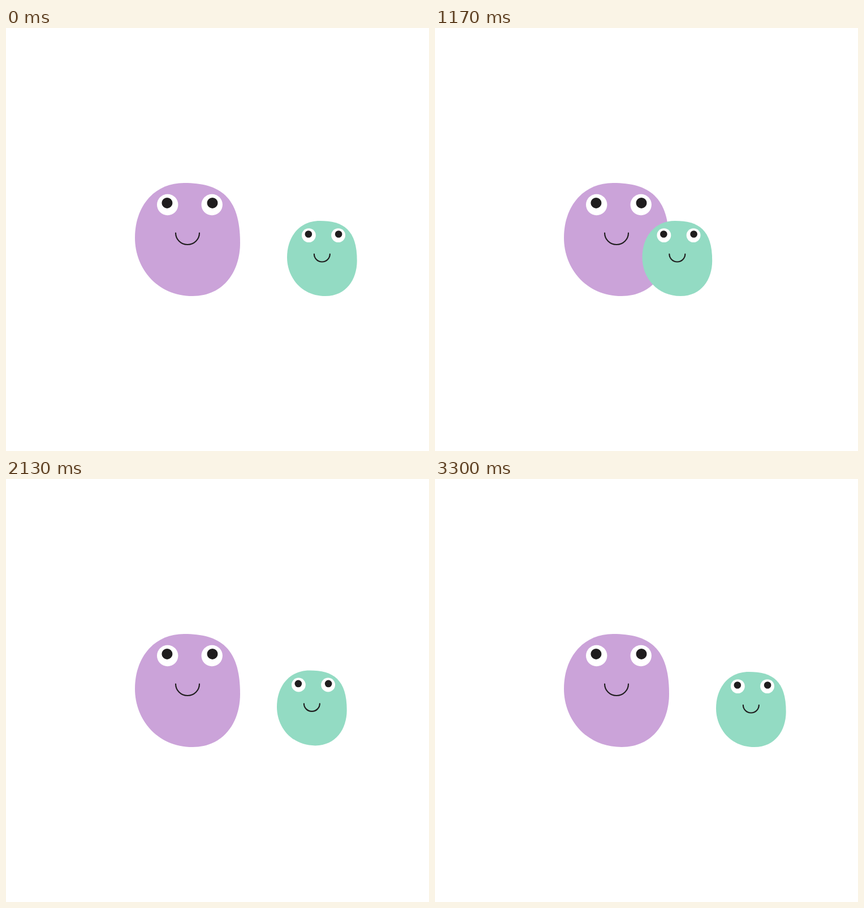
Animation, 748 px wide and 748 px high, one loop 4470 ms. Source, as an HTML page:

```html
<!DOCTYPE html>
<html lang="en">
<head>
<meta charset="utf-8">
<title>Two friends</title>
<style>
  html, body { margin: 0; width: 100%; height: 100%; overflow: hidden; background: #fff; }
  svg { display: block; width: 100vw; height: 100vh; }
  .white { fill: #fff; }
  .pupil { fill: #1f1d1e; }
  .mouth { fill: none; stroke: #1f1d1e; stroke-width: 2.1; stroke-linecap: round; vector-effect: non-scaling-stroke; }
  #arm { fill: none; stroke: #cba3d9; stroke-width: 13; stroke-linecap: round; }
</style>
</head>
<body>
<svg viewBox="0 0 748 748">
  <g id="big" fill="#cba3d9"></g>
  <path id="arm"/>
  <g id="small" fill="#93dbc3"></g>
</svg>
<script>
const LOOP = 4470, STEP = 30, SCALE = 0.665, PULL = 130.5;
const $ = id => document.getElementById(id);
const clamp = v => Math.min(1, Math.max(0, v));
const span = (t, a, b) => clamp((t - a) / (b - a));
const easeOut = (u, n) => 1 - Math.pow(1 - u, n);

const eye = (x, px) => `<g class="eye"><circle class="white" cx="${x}" cy="312.5" r="18.7"/>
  <circle class="pupil" cx="${px}" cy="309.4" r="9.5"/></g>`;
const face = `<path d="M315 274C378 274 414 298 414 380C414 430 385 474 330 474C268 474 228 426 228 371C228 315 262 274 315 274Z"/>
  <g class="eyes">${eye(285.7, 284.9)}${eye(364.2, 365)}</g>
  <path class="mouth" d="M300 362.5a21 20.5 0 0 0 42 0"/>`;

function makeBlob(id) {
  const root = $(id);
  root.innerHTML = face;
  return {
    root,
    eyes: root.querySelector('.eyes'),
    lids: root.querySelectorAll('.eye'),
    mouth: root.querySelector('.mouth')
  };
}
const big = makeBlob('big'), small = makeBlob('small'), arm = $('arm');

function pose(blob, dir, look, open) {
  blob.eyes.setAttribute('transform', `translate(${dir * 7 * look} 0)`);
  blob.mouth.setAttribute('transform', `translate(${dir * 5 * look} ${-5 * look})`);
  for (const lid of blob.lids)
    lid.setAttribute('transform', `translate(0 312.5) scale(1 ${open}) translate(0 -312.5)`);
}

// Pulled in by the arm, then hopping back with a small dip on landing.
function smallOffset(t) {
  if (t < 1800) return [-PULL * easeOut(span(t, 110, 540), 3.09), 0];
  const x = t < 2130
    ? -PULL + 112.5 * span(t, 1800, 2130)
    : -18 * (1 - easeOut(span(t, 2130, 2220), 2));
  let y;
  if (t < 1950) y = -49 * easeOut(span(t, 1800, 1950), 2);
  else if (t < 2160) y = -49 + 58 * Math.pow(span(t, 1950, 2160), 1.45);
  else y = 9 * (1 - span(t, 2160, 2220));
  return [x, y];
}

function drawArm(t) {
  const shown = t > 0 && t < 690;
  arm.style.display = shown ? '' : 'none';
  if (!shown) return;
  let x;
  if (t < 110) x = 400 + 246 * easeOut(span(t, 0, 110), 1.6);
  else if (t <= 540) x = 646 - 139 * easeOut(span(t, 110, 540), 3.41);
  else x = 507 - 26 * span(t, 540, 690);
  arm.setAttribute('d', x < 440
    ? `M390 405L${x} 398`
    : `M390 405C425 385 ${x - 50} 385 ${x - 22} 397C${x - 6} 404 ${x} 412 ${x} 422`);
}

function draw(t) {
  const blink = Math.min(span(t, 900, 1020), 1 - span(t, 1080, 1170));
  const look = Math.pow(Math.sin(Math.PI * span(t, 2700, 3300)), 1.5) || 0;
  const open = 1 - 0.92 * blink;
  pose(big, 1, look, open);
  pose(small, -1, look, open);
  const [dx, dy] = smallOffset(t);
  small.root.setAttribute('transform',
    `translate(${497 + dx} ${474 + dy}) scale(${SCALE}) translate(-228 -474)`);
  drawArm(t);
}

const start = performance.now();
function tick() {
  const t = (performance.now() - start) % LOOP;
  draw(Math.floor(t / STEP) * STEP);
  requestAnimationFrame(tick);
}
tick();
</script>
</body>
</html>
```
